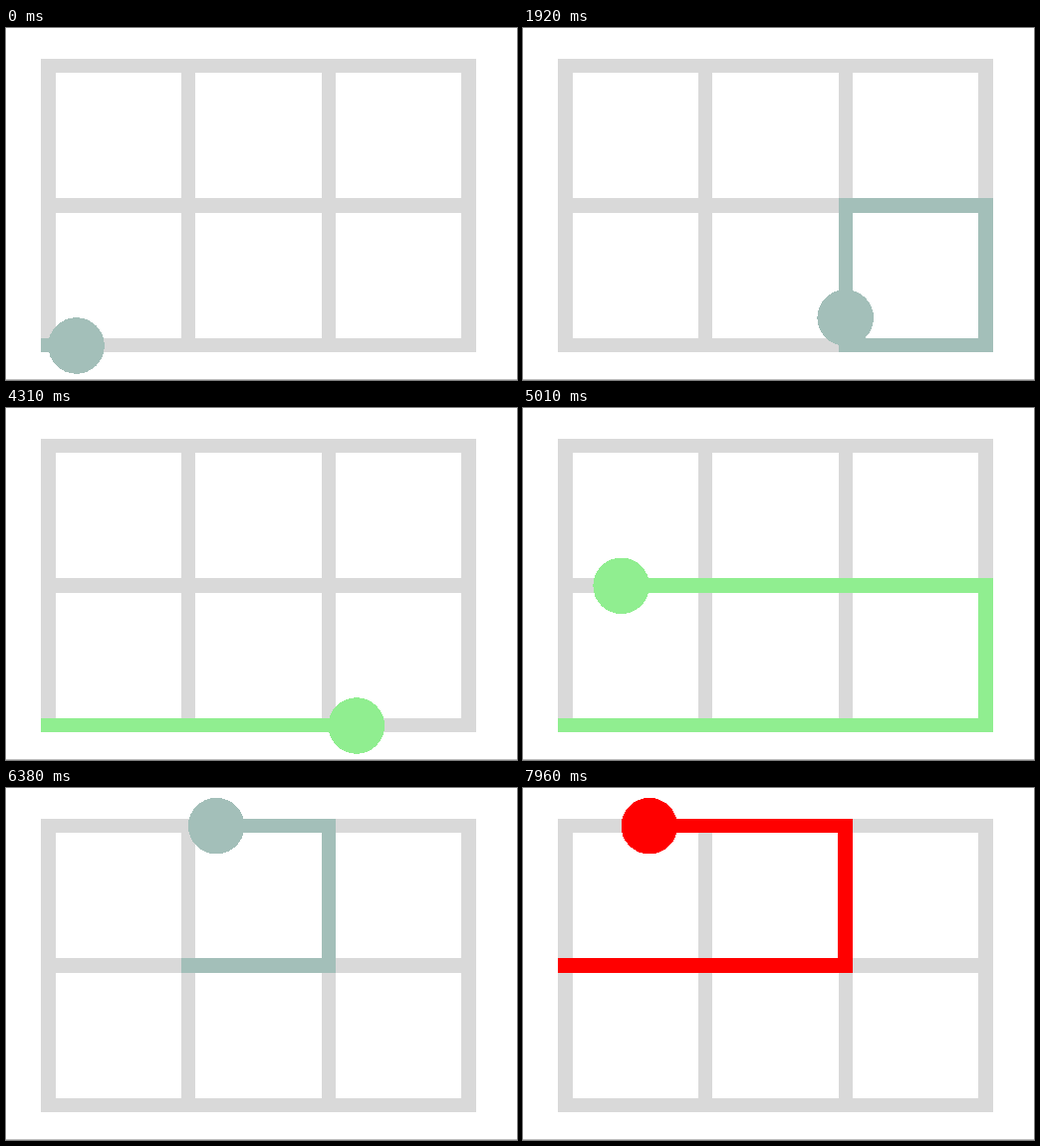
Animation, 513 px wide and 354 px high, one loop 8 s. Source, as an HTML page:

```html
<!DOCTYPE html>
<html lang="en">
<head>
<meta charset="utf-8">
<title>Rectangles in a grid</title>
<style>
  html, body { margin: 0; width: 100%; height: 100%; overflow: hidden; background: #fff; }
  svg { display: block; width: 513px; height: 354px; shape-rendering: crispEdges; }
  path { fill: none; stroke-width: 14.4; stroke-linecap: square; stroke-linejoin: miter; }
</style>
</head>
<body>
<svg viewBox="0 0 513 354">
  <rect y="353" width="513" height="1" fill="#c0c0c0"/>
  <path id="grid" stroke="#d9d9d9"/>
  <path id="trail"/>
  <circle id="ball" r="28.3"/>
</svg>
<script>
  const LOOP = 8000, STEP_MS = 33.03, LEAD = 0.4;
  const CELL = 140.65, LEFT = 42.4, TOP = 37.9;
  const STEPS_PER_SIDE = 5;
  const COLORS = { 1: '#a3bfb9', 2: '#ff0000', 3: '#90ee90' };
  const [grid, trail, ball] = ['grid', 'trail', 'ball'].map(id => document.getElementById(id));

  const colX = c => LEFT + c * CELL;
  const rowY = r => TOP + r * CELL;

  grid.setAttribute('d',
    [0, 1, 2].map(r => `M${colX(0)} ${rowY(r)}H${colX(3)}`).join('') +
    [0, 1, 2, 3].map(c => `M${colX(c)} ${rowY(0)}V${rowY(2)}`).join(''));

  // Every one-row rectangle, bottom row first, narrow to wide.
  const tours = [];
  for (const row of [2, 1])
    for (let width = 1; width <= 3; width++)
      for (let col = 0; col + width <= 3; col++)
        tours.push({ row, col, width, steps: 2 * (width + 1) * STEPS_PER_SIDE });

  function locate(step) {
    for (const tour of tours) {
      if (step <= tour.steps) return { tour, step };
      step -= tour.steps;
    }
  }

  function draw(time) {
    const { tour, step } = locate(1 + Math.floor(time / STEP_MS + LEAD));
    const { row, col, width, steps } = tour;
    const color = COLORS[width];
    trail.setAttribute('d',
      `M${colX(col)} ${rowY(row)}h${width * CELL}v${-CELL}h${-width * CELL}z`);
    const length = 2 * (width + 1) * CELL;
    const done = length * step / steps;
    trail.setAttribute('stroke', color);
    trail.setAttribute('stroke-dasharray', step < steps ? `${done} ${2 * length}` : 'none');
    const at = trail.getPointAtLength(done);
    ball.setAttribute('cx', at.x);
    ball.setAttribute('cy', at.y + 0.3);
    ball.setAttribute('fill', color);
  }

  const start = performance.now();
  function tick() {
    draw((performance.now() - start) % LOOP);
    requestAnimationFrame(tick);
  }
  tick();
</script>
</body>
</html>
```
